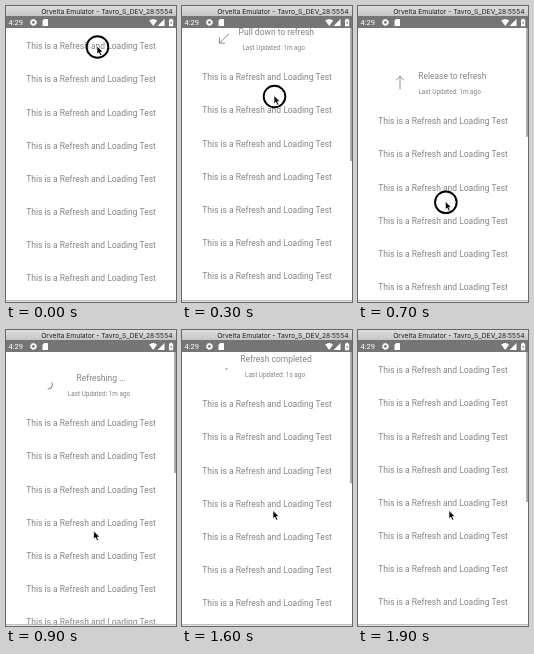
Write an HTML page that moves like this. It is 170 px wide and 296 px high and loops after 2 s.

```html
<!DOCTYPE html>
<html lang="en">
<head>
<meta charset="utf-8">
<title>Pull to refresh</title>
<style>
  html, body { margin: 0; width: 100%; height: 100%; overflow: hidden; background: #fff; }
  svg { display: block; width: 100vw; height: 100vh; }
  text { font-family: Roboto, sans-serif; fill: #858585; }
  .row, .title { font-size: 8.5px; text-anchor: middle; }
  .sub { font-size: 6.4px; text-anchor: middle; }
  .window { font: 6.75px Inter, sans-serif; fill: #222; text-anchor: end; }
  .clock { font-size: 7.6px; fill: #fff; }
  .line { fill: none; stroke: #858585; }
</style>
</head>
<body>
<svg viewBox="0 0 170 296">
  <defs>
    <linearGradient id="chrome" x2="0" y2="1">
      <stop stop-color="#dedede"/><stop offset="1" stop-color="#c6c6c6"/>
    </linearGradient>
    <clipPath id="screen"><rect y="22" width="170" height="272.5"/></clipPath>
  </defs>
  <rect width="170" height="296" fill="#fff"/>

  <g clip-path="url(#screen)">
    <g id="list">
      <text id="title" class="title" y="-2"></text>
      <text id="sub" class="sub" y="13"></text>
      <path id="arrow" class="line" d="M0 6.7V-6.5M-4 -2.3L0 -6.5L4 -2.3" stroke-width=".9"/>
      <path id="spinner" class="line" stroke-width="1.1"/>
    </g>
    <rect id="bar" x="168.2" y="22" width="1.8" fill="#a2a2a2"/>
  </g>

  <rect width="170" height="10" fill="url(#chrome)"/>
  <text class="window" x="166.5" y="7.6">Orvelta Emulator - Tavro_S_DEV_28:5554</text>
  <rect y="10" width="170" height="12" fill="#757575"/>
  <text class="clock" x="2.5" y="19.2">4:29</text>
  <g fill="#fff">
    <circle cx="27.4" cy="16.4" r="2.1" fill="none" stroke="#fff" stroke-width="1.5"/>
    <circle cx="27.4" cy="16.4" r="3.1" fill="none" stroke="#fff" stroke-width="1" stroke-dasharray="1.3 1.135"/>
    <path d="M38.3 13H42V20H36.5V14.8Z"/>
    <path d="M143.2 14.6Q147.2 11.4 151.2 14.6L147.2 20Z"/>
    <path d="M158.5 13V20H151.5Z"/>
    <path d="M163 13.6H164.2V12.7H166V13.6H167.2V20.2H163Z"/>
  </g>
  <path d="M165.5 14.7L164 17.3H165.2L164.7 19.2L166.3 16.5H165Z" fill="#757575"/>
  <path d="M0 294.8H170" stroke="#999" stroke-width=".9"/>

  <circle id="ring" r="10.8" fill="none" stroke="#000" stroke-width="1.9"/>
  <path id="cursor" d="M0 0V8.3L1.9 6.6L3.3 9.7L4.9 9L3.5 6H6Z" stroke="#fff" stroke-width=".7"/>
</svg>
<script>
const LOOP = 2000, STEP = 100, HEADER = 42.5, RELEASE = 750, DONE = 1450;
const $ = id => document.getElementById(id);
const list = $('list');

// Keys as [time, value] pairs
const pull = [[0, 0], [100, 4], [200, 15], [300, 31], [500, 63], [600, 71], [700, 75],
  [800, 65], [900, 53], [1000, 47], [1150, 43.3], [1300, 43], [1450, 42.5], [1600, 34],
  [1700, 17], [1800, 5], [1900, 0]];
const pointerX = [[0, 91], [300, 92], [500, 87], [900, 87.7], [1300, 91]];
const pointerY = [[0, 40], [100, 48], [300, 89.5], [500, 158], [650, 192], [800, 202],
  [900, 201], [1100, 190], [1300, 180.5]];
const arcHead = [[800, 35], [900, 95], [1300, 330], [1600, 425]];
const arcTail = [[800, -40], [900, -30], [1300, 60], [1600, 400], [1900, 420]];

function at(keys, t) {
  const i = keys.findIndex(k => k[0] > t);
  if (i < 0) return keys[keys.length - 1][1];
  if (i === 0) return keys[0][1];
  const [t0, v0] = keys[i - 1], [t1, v1] = keys[i];
  return v0 + (v1 - v0) * (t - t0) / (t1 - t0);
}

function arc(a, b, r) {
  const point = deg => {
    const q = deg * Math.PI / 180;
    return `${r * Math.cos(q)} ${r * Math.sin(q)}`;
  };
  return `M${point(a)}A${r} ${r} 0 ${b - a > 180 ? 1 : 0} 1 ${point(b)}`;
}

function label(id, text, x) {
  $(id).textContent = text;
  $(id).setAttribute('x', x);
}

function place(id, x, y, extra = '') {
  $(id).setAttribute('transform', `translate(${x} ${y}) ${extra}`);
}

function show(id, visible) {
  $(id).style.display = visible ? '' : 'none';
}

for (let i = 0; i < 9; i++) {
  const row = document.createElementNS(list.namespaceURI, 'text');
  row.setAttribute('class', 'row');
  row.setAttribute('x', 85);
  row.setAttribute('y', 43.3 + i * 33.15);
  row.textContent = 'This is a Refresh and Loading Test';
  list.append(row);
}

function draw(t) {
  const offset = at(pull, t);
  const busy = t >= RELEASE, done = t >= DONE;
  place('list', 0, offset);

  if (done) label('title', 'Refresh completed', 94);
  else if (busy) label('title', 'Refreshing ...', 95.2);
  else if (offset >= HEADER) label('title', 'Release to refresh', 94.3);
  else label('title', 'Pull down to refresh', 94.3);
  label('sub', `Last Updated: ${done ? '1s' : '1m'} ago`, busy ? 93 : 91.6);

  // The arrow turns from down to up as the pull passes the threshold
  const turn = Math.min(1, Math.max(0, (offset - 25.5) / 21.5));
  place('arrow', 42, 1.6, `rotate(${180 + 180 * turn})`);
  show('arrow', !busy);
  place('spinner', 42, 1.6);
  $('spinner').setAttribute('d', arc(at(arcTail, t), at(arcHead, t), 4.4));
  show('spinner', busy);

  $('bar').setAttribute('height', 150 - 0.55 * offset);
  show('bar', t > 0);

  const x = at(pointerX, t), y = at(pointerY, t);
  place('ring', x + .5, y + 1);
  show('ring', !busy);
  place('cursor', x, y);
}

function tick() {
  const t = performance.now() % LOOP;
  draw(Math.floor(t / STEP) * STEP);
  requestAnimationFrame(tick);
}
tick();
</script>
</body>
</html>
```
